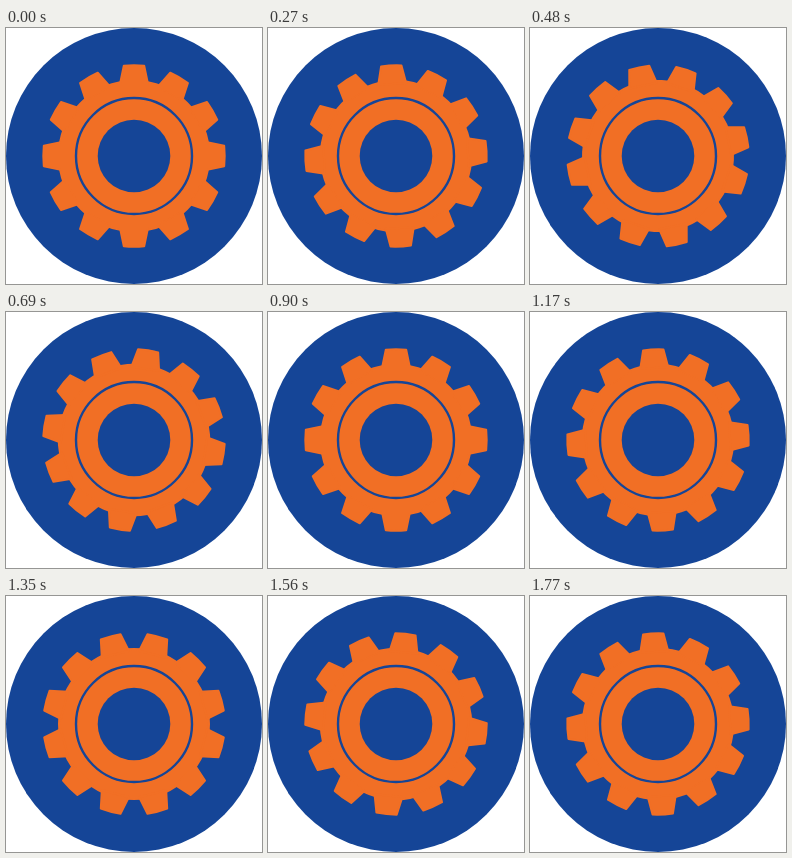
Write an HTML page that moves like this. It is 256 by 256 pixels and loops after 1.8 s.

```html
<!DOCTYPE html>
<html lang="en">
<head>
<meta charset="utf-8">
<title>Turning gear</title>
<style>
  html, body { margin: 0; width: 100%; height: 100%; overflow: hidden; background: #fff; }
  svg { display: block; width: 100vw; height: 100vh; }
</style>
</head>
<body>
<svg viewBox="-128 -128 256 256">
  <circle r="128" fill="#154597"/>
  <g id="gear" fill="#f16f25" stroke="#f16f25" stroke-width="2" stroke-linejoin="round">
    <circle r="75"/>
  </g>
  <circle r="58" fill="none" stroke="#154597" stroke-width="2.4"/>
  <circle r="36.3" fill="#154597"/>
</svg>
<script>
  const TEETH = 12, LOOP = 1800, STEP = 30, DEG_PER_STEP = 3;
  const gear = document.getElementById('gear');

  for (let i = 0; i < TEETH; i++) {
    const tooth = document.createElementNS('http://www.w3.org/2000/svg', 'path');
    tooth.setAttribute('d', 'M-14 -72L-10.2 -90.2Q0 -91.2 10.2 -90.2L14 -72Z');
    tooth.setAttribute('transform', `rotate(${i * 360 / TEETH})`);
    gear.append(tooth);
  }

  const start = performance.now();
  function draw() {
    const t = (performance.now() - start) % LOOP;
    gear.setAttribute('transform', `rotate(${Math.floor(t / STEP) * DEG_PER_STEP})`);
    requestAnimationFrame(draw);
  }
  draw();
</script>
</body>
</html>
```
